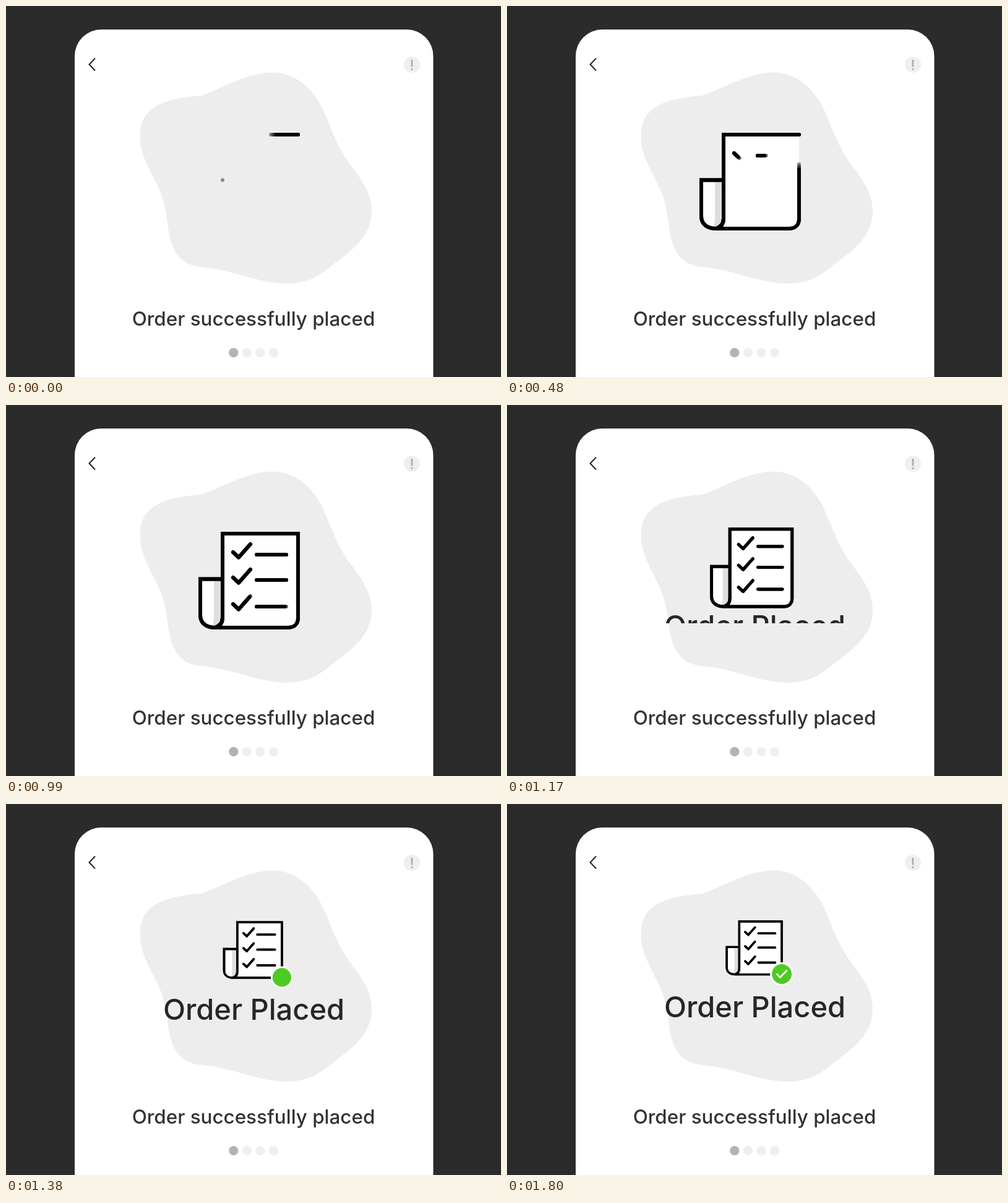
Animation, 800 px wide and 600 px high, one loop 2.97 s. Source, as an HTML page:

```html
<!DOCTYPE html>
<html lang="en">
<head>
<meta charset="utf-8">
<title>Order placed</title>
<style>
  html, body { margin: 0; width: 100%; height: 100%; overflow: hidden; background: #2b2b2b; }
  svg { display: block; width: 100%; height: 100%; }
  text { font-family: Inter, "Open Sans", sans-serif; font-weight: 500; font-optical-sizing: none; text-anchor: middle; }
</style>
</head>
<body>
<svg viewBox="0 0 800 600">
  <defs>
    <clipPath id="foldClip"><path id="foldArea"/></clipPath>
    <clipPath id="titleClip"><rect x="240" y="290" width="320" height="63"/></clipPath>
  </defs>
  <rect width="800" height="600" fill="#2b2b2b"/>
  <rect x="111" y="38" width="579.5" height="640" rx="43" fill="#fff"/>
  <path d="M144 84.5L134.5 94.5L144 104.5" fill="none" stroke="#222" stroke-width="2"/>
  <circle cx="656" cy="95" r="13" fill="#efefef"/>
  <text x="656" y="104" font-size="23" fill="#a9a9a9">!</text>
  <path fill="#ededed" d="M430 107.5C472 107 501 141 513 169C527 201 535 227 556 256C578 285 591 305 591 332
    C591 371 561 394 534 414C514 429 496 449 455 449C407 449 370 427 315 422C278 419 266 391 262 358
    C257 318 252 304 241 283C229 259 216 236 216.5 210C217 165 250 150 315 145C343 137 386 108 430 107.5Z"/>
  <text x="400" y="517" font-size="31.4" fill="#333">Order successfully placed</text>
  <g id="dots" fill="#efefef">
    <circle cx="367.8" cy="560.7" r="7.6" fill="#b3b3b3"/>
    <circle cx="389.4" cy="560.7" r="7.6"/>
    <circle cx="411" cy="560.7" r="7.6"/>
    <circle cx="432.6" cy="560.7" r="7.6"/>
  </g>

  <g id="doc" fill="none" stroke="#000" stroke-width="6" stroke-linecap="round">
    <g id="fold">
      <path id="foldFill" fill="#fff" stroke="none"/>
      <path d="M336 283V344Q336 354 331 360H350V283Z" fill="#dedede" stroke="none" clip-path="url(#foldClip)"/>
    </g>
    <g id="page"><path id="pageFill" fill="#fff" stroke="none"/></g>
    <g id="rows" stroke-linejoin="round"></g>
  </g>

  <g clip-path="url(#titleClip)"><text id="title" x="400.5" y="345" font-size="47" fill="#262626">Order Placed</text></g>

  <g id="badge">
    <circle r="19" fill="#fff"/>
    <circle r="16" fill="#4dcb22"/>
    <g id="tick" fill="none" stroke="#fff" stroke-width="2.5" stroke-linecap="round" stroke-linejoin="round"></g>
  </g>
</svg>
<script>
const LOOP = 2970, STEP = 30;
const $ = id => document.getElementById(id);
const clamp = (v, lo, hi) => Math.min(hi, Math.max(lo, v));
const easeOut = (t, start, length, power) => 1 - (1 - clamp((t - start) / length, 0, 1)) ** power;

function addPath(parent, d) {
  const p = document.createElementNS("http://www.w3.org/2000/svg", "path");
  p.setAttribute("d", d);
  parent.appendChild(p);
  return p;
}

// A line that is drawn on, with a soft tip made of a few faint copies.
function makeLine(parent, d, soft) {
  const copies = [0, 1, 2, 3].map(() => addPath(parent, d));
  const total = copies[0].getTotalLength();
  copies.slice(1).forEach(p => p.setAttribute("opacity", 0.42));
  function draw(len) {
    copies.forEach((p, i) => {
      const part = len - soft * (3 - i) / 3;
      p.style.display = part < 0 ? "none" : "";
      if (part >= total) p.removeAttribute("stroke-dasharray");
      else p.setAttribute("stroke-dasharray", Math.max(part, 0.01) + " 2000");
    });
  }
  return { draw, total, path: copies[0] };
}

// Outline of the drawn part, closed straight back to its start.
function areaOf(line, len) {
  const end = clamp(len, 0, line.total);
  const pts = [];
  for (let s = 0; s < end; s += 2) pts.push(s);
  pts.push(end);
  return "M" + pts.map(s => {
    const p = line.path.getPointAtLength(s);
    return p.x.toFixed(2) + " " + p.y.toFixed(2);
  }).join("L") + "Z";
}

const fold = makeLine($("fold"), "M350 281.5H314V340C314 353 324 360 338 360C345 357 350 352 350 345", 7);
const page = makeLine($("page"), "M472 208H350V344C350 352 346 358 339 360H456C466 360 472 354 472 344V208Z", 9);
const rows = [242, 283, 326].map(y => [
  makeLine($("rows"), `M367 ${y - 4}L376 ${y + 4.5}L395 ${y - 17}`, 4),
  makeLine($("rows"), `M405 ${y}H453`, 4)
]);
const tick = makeLine($("tick"), "M-8 .2L-2.8 5.3L8 -5.7", 1.5);

function render(t) {
  const pageLen = 44 + 0.97 * t, foldLen = 0.37 * t;
  page.draw(pageLen);
  fold.draw(foldLen);
  $("pageFill").setAttribute("d", areaOf(page, pageLen));
  const foldShape = areaOf(fold, foldLen);
  $("foldFill").setAttribute("d", foldShape);
  $("foldArea").setAttribute("d", foldShape);

  rows.forEach((row, k) => {
    const start = 428 + 146 * k;
    const p = easeOut(t, start, 360, 2);
    row.forEach(line => line.draw(t < start ? -1 : p * (line.total + 4)));
  });

  // The sheet shrinks and rises around its centre.
  const move = easeOut(t, 1095, 475, 3);
  const scale = 1 - 0.437 * move;
  const cx = 393 + 6.6 * move, cy = 284 - 51.2 * move;
  $("doc").setAttribute("transform", `translate(${cx} ${cy}) scale(${scale}) translate(-393 -284)`);

  $("title").setAttribute("y", 345 + 42 * (1 - easeOut(t, 1115, 495, 3)));

  const pop = easeOut(t, 1250, 210, 3);
  $("badge").style.display = pop > 0 ? "" : "none";
  $("badge").setAttribute("transform", `translate(${cx + 79 * scale} ${cy + 75 * scale}) scale(${pop})`);
  tick.draw(t < 1560 ? -1 : easeOut(t, 1560, 240, 2) * (tick.total + 1.5));
}

const begin = performance.now();
function frame() {
  const t = (performance.now() - begin) % LOOP;
  render(Math.floor(t / STEP) * STEP);
  requestAnimationFrame(frame);
}
frame();
</script>
</body>
</html>
```
